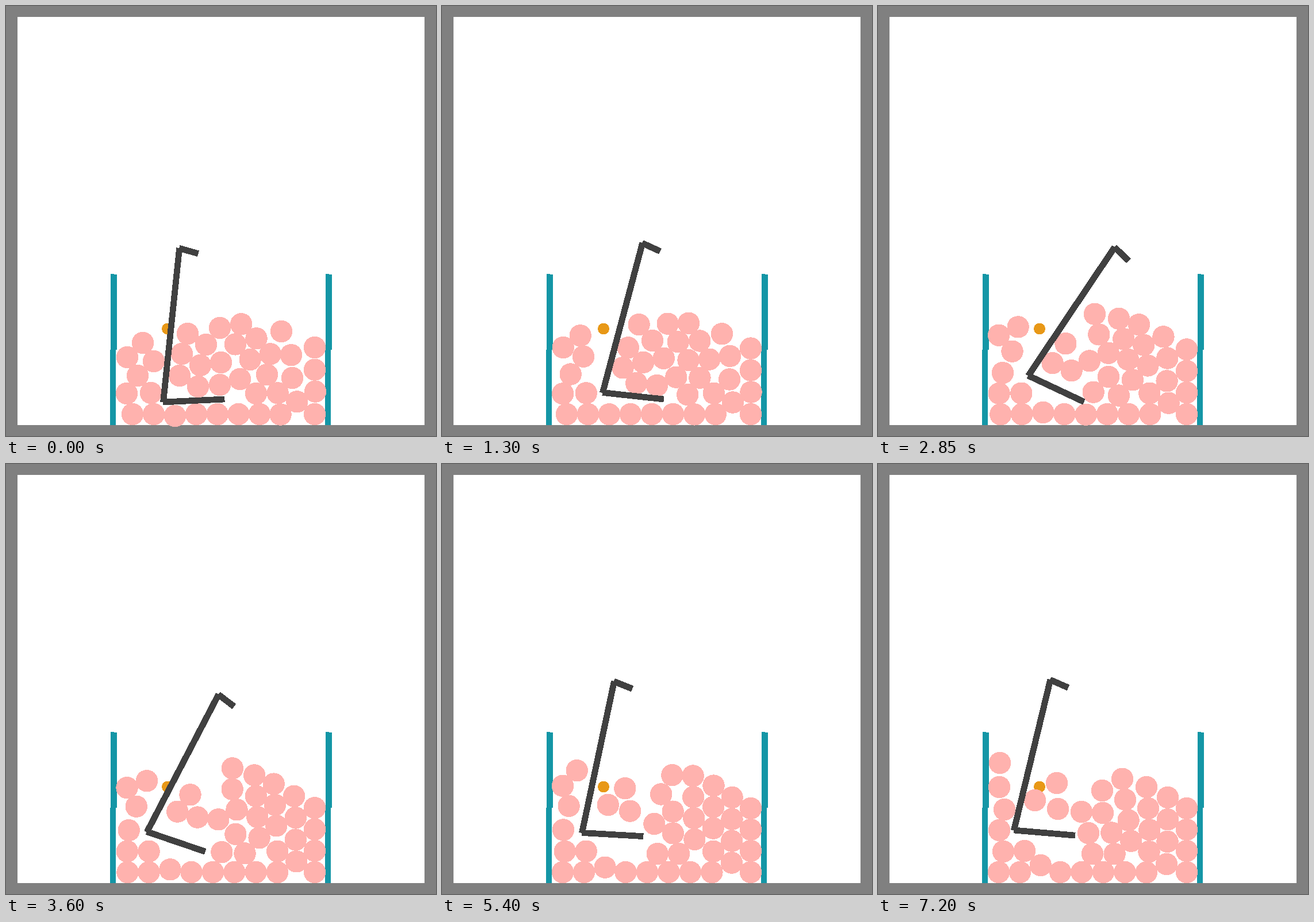
These frames come from a looping animation (748 by 748 pixels, 7250 ms). A matplotlib script:

```python
import numpy as np
import matplotlib.pyplot as plt
from matplotlib.animation import FuncAnimation
from matplotlib.patches import Circle, Polygon, Rectangle

SIZE, DPI = 748, 100
STEP, FRAMES = 50, 145
R, BAR_W = 18.6, 9.7
BAR, BASE, HOOK = 269, 106.5, 33.5
PINK, ORANGE, TEAL, DARK = "#ffb2ae", "#e89817", "#1496a6", "#404040"


def ease(t, ts, vs):
    """Cosine easing from one key value to the next."""
    i = np.clip(np.searchsorted(ts, t, side="right") - 1, 0, len(ts) - 2)
    s = (t - ts[i]) / (ts[i + 1] - ts[i])
    return vs[i] + (vs[i + 1] - vs[i]) * (1 - np.cos(np.pi * s)) / 2, s


def ray(p, deg, length):
    a = np.radians(deg)
    return p + length * np.array([np.cos(a), np.sin(a)])


# Stirrer: time, heel x, heel y, tilt in degrees
KEYS = np.array([(0, 273.5, 689, 6), (1300, 279.5, 672.5, 14.9),
                 (2850, 261.5, 643, 33.9), (4250, 232.5, 646, 22.4),
                 (5400, 243.5, 641.5, 12), (6200, 245.5, 636.5, 17.3),
                 (7200, 236.5, 637, 13.6)])


def tool(t):
    (x, y, lean), s = ease(t, KEYS[:, 0], KEYS[:, 1:])
    # hops between keys, lower the more it leans
    heel = np.array([x, y - 26 * (1 - lean / 34) * np.sin(np.pi * s) ** 2])
    top = ray(heel, lean - 90, BAR)
    return [(heel, top), (heel, ray(heel, lean - 8.7, BASE)),
            (top, ray(top, lean + 9.8, HOOK))]


HEAP_T = [0, 4250, 7200]
rows = []


def row(n, start, mid, end=None):
    """n evenly spaced balls on a line that moves from start to mid to end."""
    lines = [start, mid, end or mid]
    rows.append([np.linspace(l[:2], l[-2:], n) for l in lines])


# floor
row(2, (220, 710, 257, 710), (210, 710, 247, 710))
row(1, (294, 713), (284, 704), (283, 698))
row(5, (331, 710, 478, 710), (321, 710, 471, 710), (317, 710, 467, 710))
row(2, (473, 673, 435, 674), (472, 674, 412, 678))
# left of the stirrer
row(2, (210, 674, 252, 673), (211, 674, 248, 674), (218, 674, 255, 673))
row(2, (229, 643, 257, 618), (211, 636, 221, 591), (211, 637, 220, 601))
row(2, (211, 611, 238, 586), (211, 555, 246, 545), (211, 562, 212, 520))
# on the foot
row(2, (302, 643, 306, 605), (299, 598, 323, 570), (273, 585, 311, 555))
row(1, (334, 662), (336, 606), (313, 600))
row(2, (338, 625, 372, 659), (372, 616, 376, 678), (366, 642, 373, 678))
# slanted rows that straighten into columns
row(2, (407, 649, 374, 620), (398, 643, 405, 598), (407, 641, 391, 607))
row(2, (348, 589, 316, 570), (402, 560, 408, 524), (354, 605, 390, 568))
row(4, (454, 641, 372, 560), (439, 651, 443, 539), (440, 656, 425, 548))
row(3, (464, 605, 409, 555), (471, 632, 476, 558), (473, 636, 467, 562))
row(4, (507, 688, 479, 566), (505, 692, 505, 580), (502, 696, 504, 580))
row(4, (537, 710, 537, 594), (537, 710, 537, 599))

heaps = [np.vstack(h) for h in zip(*rows)]


def heap(t):
    i = int(t >= HEAP_T[1])
    s = (t - HEAP_T[i]) / (HEAP_T[i + 1] - HEAP_T[i])
    return heaps[i] + s * (heaps[i + 1] - heaps[i])


def settle(p, segs, rounds=14, r=18.2):
    """Push balls off each other, the stirrer and the walls."""
    for _ in range(rounds):
        diff = p[:, None] - p[None]
        dist = np.hypot(diff[..., 0], diff[..., 1]) + 1e-9
        push = np.clip(2 * r - dist, 0, None) / dist
        np.fill_diagonal(push, 0)
        p = p + 0.35 * (diff * push[..., None]).sum(1)
        for a, b in segs:
            ab = b - a
            s = np.clip((p - a) @ ab / (ab @ ab), 0, 1)
            off = p - a - s[:, None] * ab
            d = np.hypot(off[:, 0], off[:, 1]) + 1e-9
            p += off * (np.clip(r + 4.5 - d, 0, None) / d)[:, None]
        p = np.clip(p, (210, 0), (538, 713))
    return p


fig = plt.figure(figsize=(SIZE / DPI, SIZE / DPI), dpi=DPI, facecolor="#808080")
ax = fig.add_axes([0, 0, 1, 1])
ax.set(xlim=(0, SIZE), ylim=(SIZE, 0))
ax.axis("off")


def put(patch):
    patch.set(antialiased=False, linewidth=0)
    return ax.add_patch(patch)


put(Rectangle((20, 19), 708, 710, color="white"))
for x in (182, 556):
    put(Polygon([(x, 466.5), (x + 10.5, 467.5), (x + 10.5, 598), (x + 0.5, 598)],
                color=TEAL))
    put(Rectangle((x - 0.5, 598), 10, 131, color=TEAL))
put(Circle((281, 561.5), 9.3, color=ORANGE))
balls = [put(Circle(p, R, color=PINK)) for p in heaps[0]]
bars = [ax.plot([], [], color=DARK, lw=BAR_W * 72 / DPI, solid_capstyle="butt",
                antialiased=False, zorder=3)[0] for _ in range(3)]


def draw(i):
    t = i * STEP
    segs = tool(t)
    for c, p in zip(balls, settle(heap(t), segs[:2])):
        c.center = p
    for line, (a, b) in zip(bars, segs):
        line.set_data([a[0], b[0]], [a[1], b[1]])
    return balls + bars


anim = FuncAnimation(fig, draw, frames=FRAMES, interval=STEP, repeat=True)
plt.show()
```
